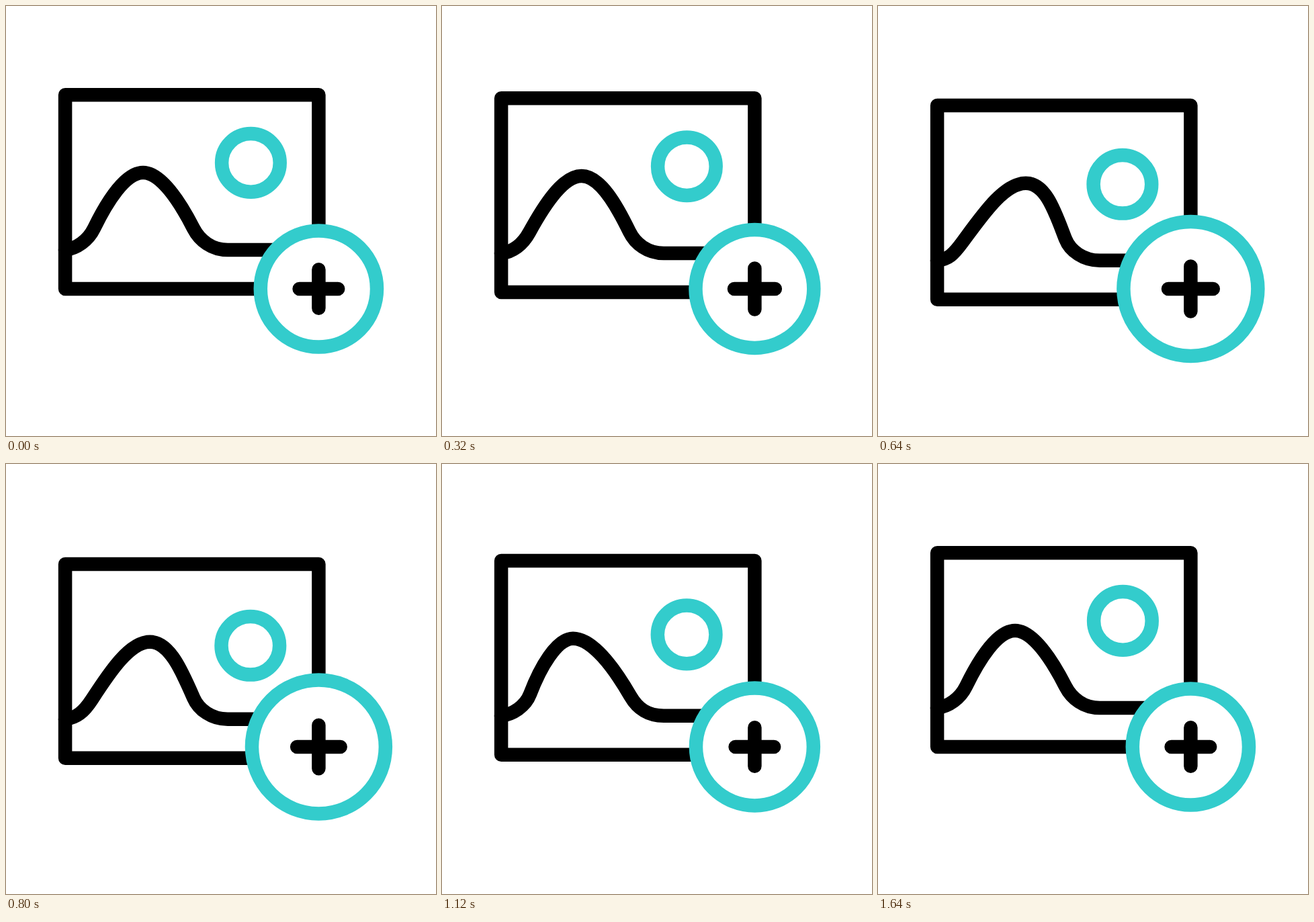
These frames come from a looping animation (640x640 px, 1880 ms). An HTML page:

```html
<!DOCTYPE html>
<html lang="en">
<head>
<meta charset="utf-8">
<title>Add picture</title>
<style>
  html, body { margin: 0; width: 100%; height: 100%; overflow: hidden; background: #fff; }
  svg { display: block; width: 100vw; height: 100vh; }
  svg * { fill: none; stroke: #000; stroke-width: 20.5; stroke-linecap: round; stroke-linejoin: round; }
  .teal { stroke: #3cc; }
  #ring { fill: #fff; }
</style>
</head>
<body>
<svg viewBox="0 0 640 640">
  <g id="card">
    <rect x="88.1" y="132.2" width="377.3" height="288.8"/>
    <path id="hill"/>
    <circle id="sun" class="teal" cx="364.4" cy="233.4" r="43.3"/>
  </g>
  <circle id="ring" class="teal" cx="465.4" cy="421"/>
  <path id="plus"/>
</svg>
<script>
const LOOP = 1880, STEP = 40, END = 1640;
const $ = id => document.getElementById(id);
const card = $('card'), hill = $('hill'), sun = $('sun'), ring = $('ring'), plus = $('plus');

// [time in ms, value]
const tracks = {
  drop: [[0, 0], [800, 16.8], [1600, 0]],
  sun:  [[280, 0], [800, 20.1], [840, 20.1], [1360, 0]],
  ring: [[220, 0], [680, 13.6], [720, 13.6], [1205, 0]],
  plus: [[120, 0], [600, 4.6], [640, 4.6], [1110, 0]],
  sway: [[160, 0], [640, 16], [1120, -9], [1640, 0]]
};

// Symmetric cubic-bezier(a, 0, 1 - a, 1)
function ease(x, a) {
  let lo = 0, hi = 1, u = x;
  for (let i = 0; i < 24; i++) {
    u = (lo + hi) / 2;
    const v = 1 - u;
    const bx = 3 * v * v * u * a + 3 * v * u * u * (1 - a) + u * u * u;
    if (bx < x) lo = u; else hi = u;
  }
  return u * u * (3 - 2 * u);
}

function valueAt(keys, t, a = 0.42) {
  if (t <= keys[0][0]) return keys[0][1];
  for (let i = 1; i < keys.length; i++) {
    const [t0, v0] = keys[i - 1], [t1, v1] = keys[i];
    if (t <= t1) return v0 + (v1 - v0) * ease((t - t0) / (t1 - t0), a);
  }
  return keys[keys.length - 1][1];
}

// The summit shifts by d; both feet bend so the slopes stay smooth.
function hillPath(d) {
  const right = Math.max(d, 0), left = Math.max(-d, 0);
  const top = 204 + d, y = 248;
  const foot1 = [131 - 0.3 * right, 331 + 0.25 * right];
  const foot2 = [279 + 0.15 * left, 331 + 0.3 * left];
  const out1 = [150 + 0.44 * d, 292 + 0.06 * d];
  const out2 = [259 + 0.3 * d, 292];
  const mirror = (foot, out) => foot.map((f, i) => f - 0.46 * (out[i] - f));
  return `M88 363C105 361 ${mirror(foot1, out1)} ${foot1}` +
    `C${out1} ${top - 27 - 0.3 * d} ${y} ${top} ${y}` +
    `C${top + 27 + 0.2 * Math.abs(d)} ${y} ${out2} ${foot2}` +
    `C${mirror(foot2, out2)} 306 363 330 363H420`;
}

function draw(t) {
  card.setAttribute('transform', `translate(0 ${valueAt(tracks.drop, t, 0.52)})`);
  hill.setAttribute('d', hillPath(valueAt(tracks.sway, t)));
  const s = valueAt(tracks.sun, t);
  sun.setAttribute('transform', `translate(${-0.03 * s} ${s})`);
  ring.setAttribute('r', 86.6 + valueAt(tracks.ring, t));
  const arm = 28.8 + valueAt(tracks.plus, t);
  plus.setAttribute('d', `M${465.4 - arm} 421h${2 * arm}M465.4 ${421 - arm}v${2 * arm}`);
}

function tick() {
  const t = performance.now() % LOOP;
  draw(Math.min(Math.floor(t / STEP) * STEP, END));
  requestAnimationFrame(tick);
}
tick();
</script>
</body>
</html>
```
